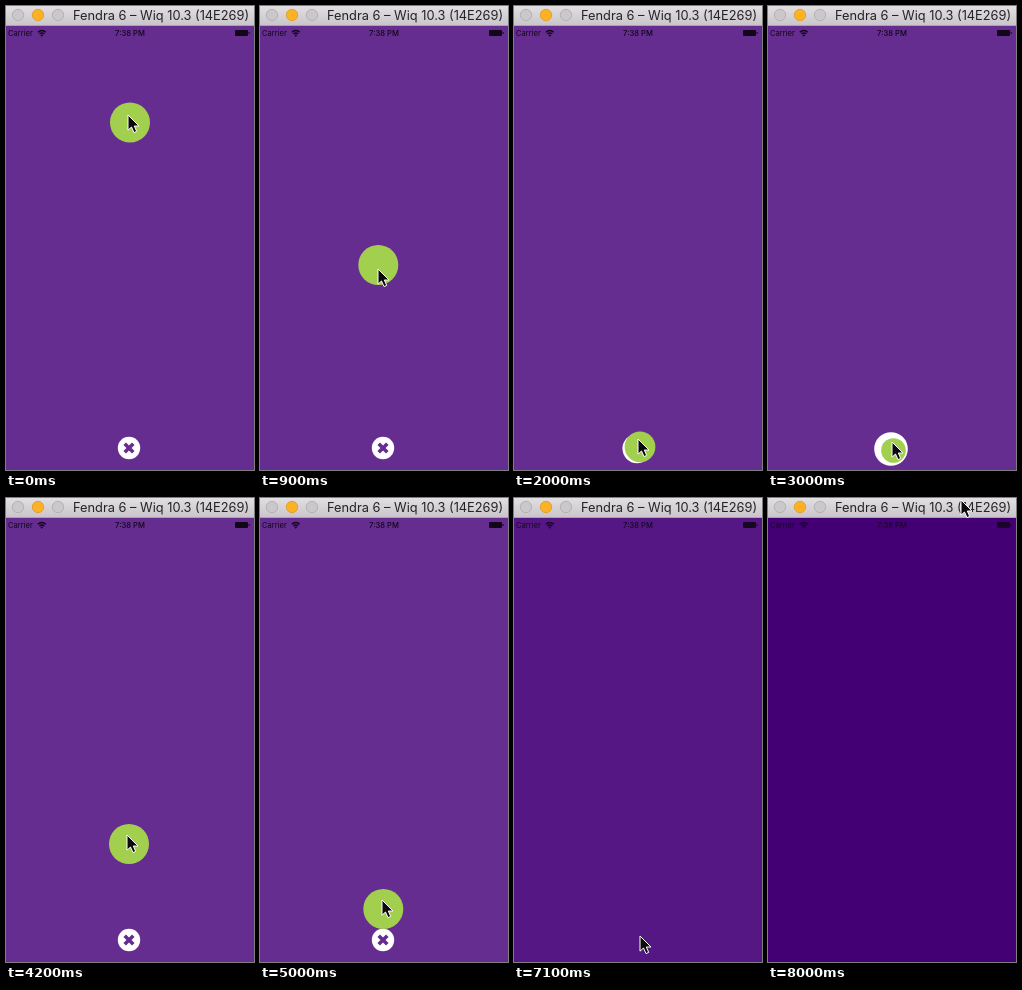
An HTML page that plays this animation: 248x464 px, repeating every 8100 ms.

```html
<!DOCTYPE html>
<html lang="en">
<head>
<meta charset="utf-8">
<title>Drag to dismiss</title>
<style>
  html, body { margin: 0; width: 100%; height: 100%; overflow: hidden; }
  svg { display: block; width: 100%; height: 100%; }
  text { font-family: Inter, Roboto, sans-serif; }
</style>
</head>
<body>
<svg viewBox="0 0 248 464">
  <defs>
    <linearGradient id="chrome" x2="0" y2="1">
      <stop offset="0" stop-color="#e2dfe3"/>
      <stop offset="1" stop-color="#c8c4c9"/>
    </linearGradient>
  </defs>
  <rect id="screen" width="248" height="464"/>

  <g id="status" fill="#120619">
    <text x="2" y="30" font-size="7.6">Carrier</text>
    <path d="M31.8 26.2Q35.8 22.7 39.8 26.2M33.4 28Q35.8 25.8 38.2 28"
          fill="none" stroke="#120619" stroke-width="1.4"/>
    <path d="M34.4 29.2Q35.8 28 37.2 29.2L35.8 30.7Z"/>
    <text x="124" y="30" font-size="7.6" font-weight="500" text-anchor="middle">7:38 PM</text>
    <rect x="229" y="24" width="13" height="6" rx="1"/>
    <rect x="242.6" y="26" width="1" height="2"/>
  </g>

  <rect width="248" height="20" fill="url(#chrome)"/>
  <path d="M0 19.5H248" stroke="#aaa3ad"/>
  <g fill="#cbc8cb" stroke="#aeaaae" stroke-width=".8">
    <circle cx="12" cy="9" r="5.7"/>
    <circle cx="32" cy="9" r="5.7" fill="#fdb225" stroke="#df9a1c"/>
    <circle cx="52" cy="9" r="5.7"/>
  </g>
  <text x="67" y="14" font-size="12.8" fill="#252326">Fendra 6 – Wiq 10.3 (14E269)</text>

  <g id="closer">
    <circle r="11.2" fill="#fff"/>
    <path d="M-4.3-4.3 4.3 4.3M4.3-4.3-4.3 4.3" stroke="#652d90" stroke-width="3.6"/>
  </g>
  <circle id="ball" fill="#a2cf4e"/>
  <path id="cursor" d="M0 0V15.2L3.5 12 6 17.6 8.7 16.4 6.3 11H11Z"
        fill="#0b0b0b" stroke="#fff" stroke-width="1" stroke-linejoin="round"/>
</svg>
<script>
const LOOP = 8100, STEP = 100;
const el = id => document.getElementById(id);
const [screenBg, statusBar, closer, ball, cursor] =
  ["screen", "status", "closer", "ball", "cursor"].map(el);

// Tracks are rows of [ms, value, ...]
const ballPos = [
  [0, 124, 116.5], [300, 113, 140], [500, 108, 172], [900, 118.3, 259],
  [1500, 120.3, 405], [1800, 126, 438], [2300, 126, 445], [2900, 126, 445],
  [3000, 125.5, 444.5], [3400, 123, 393], [3800, 123, 346], [4200, 123, 346],
  [4600, 120.5, 374], [5000, 123.3, 411], [5400, 123.3, 411],
  [5800, 126, 438], [6100, 124, 440], [6400, 124, 440], [6700, 127, 446]
];
const cursorPos = [
  [0, 122, 109], [300, 111, 139], [500, 107, 173], [900, 118, 263],
  [1500, 119.5, 402], [1800, 124, 431], [2300, 124, 436], [3000, 124, 436],
  [3400, 121, 383], [3800, 121, 337], [4200, 121, 337], [4600, 119, 370],
  [5000, 122, 402], [5400, 122, 402], [5800, 124, 430], [6100, 123, 432],
  [6400, 123, 432], [6700, 126, 438], [7500, 126, 438], [8000, 193, 2]
];
// 0 = ball free, 1 = ball captured by the close button
const capture = [
  [1700, 0], [2200, 1], [3000, 1], [3400, 0], [5700, 0], [6100, 1]
];
const dim = [[7000, 0], [7200, 1]];

const mix = (a, b, k) => a + (b - a) * k;

function at(track, t) {
  const i = track.findIndex(row => row[0] > t);
  if (i < 0) return track[track.length - 1].slice(1);
  if (i === 0) return track[0].slice(1);
  const a = track[i - 1], b = track[i];
  const k = (t - a[0]) / (b[0] - a[0]);
  return a.slice(1).map((v, n) => mix(v, b[n + 1], k));
}

function draw(ms) {
  const t = Math.floor((ms % LOOP) / STEP) * STEP;
  const [x, y] = at(ballPos, t), [cx, cy] = at(cursorPos, t);
  const [held] = at(capture, t), [dark] = at(dim, t);
  const show = t < 6900 ? "visible" : "hidden";

  ball.setAttribute("cx", x);
  ball.setAttribute("cy", y);
  ball.setAttribute("r", mix(20, 12.3, held));
  closer.setAttribute("transform",
    `translate(123 ${mix(442, 443, held)}) scale(${mix(1, 1.5, held)})`);
  ball.setAttribute("visibility", show);
  closer.setAttribute("visibility", show);
  cursor.setAttribute("transform", `translate(${cx} ${cy})`);

  const rgb = [[101, 67], [45, 0], [144, 117]].map(([a, b]) => Math.round(mix(a, b, dark)));
  screenBg.setAttribute("fill", `rgb(${rgb})`);
  statusBar.setAttribute("opacity", mix(1, .8, dark));
}

const start = performance.now();
function tick() {
  draw(performance.now() - start);
  requestAnimationFrame(tick);
}
tick();
</script>
</body>
</html>
```
